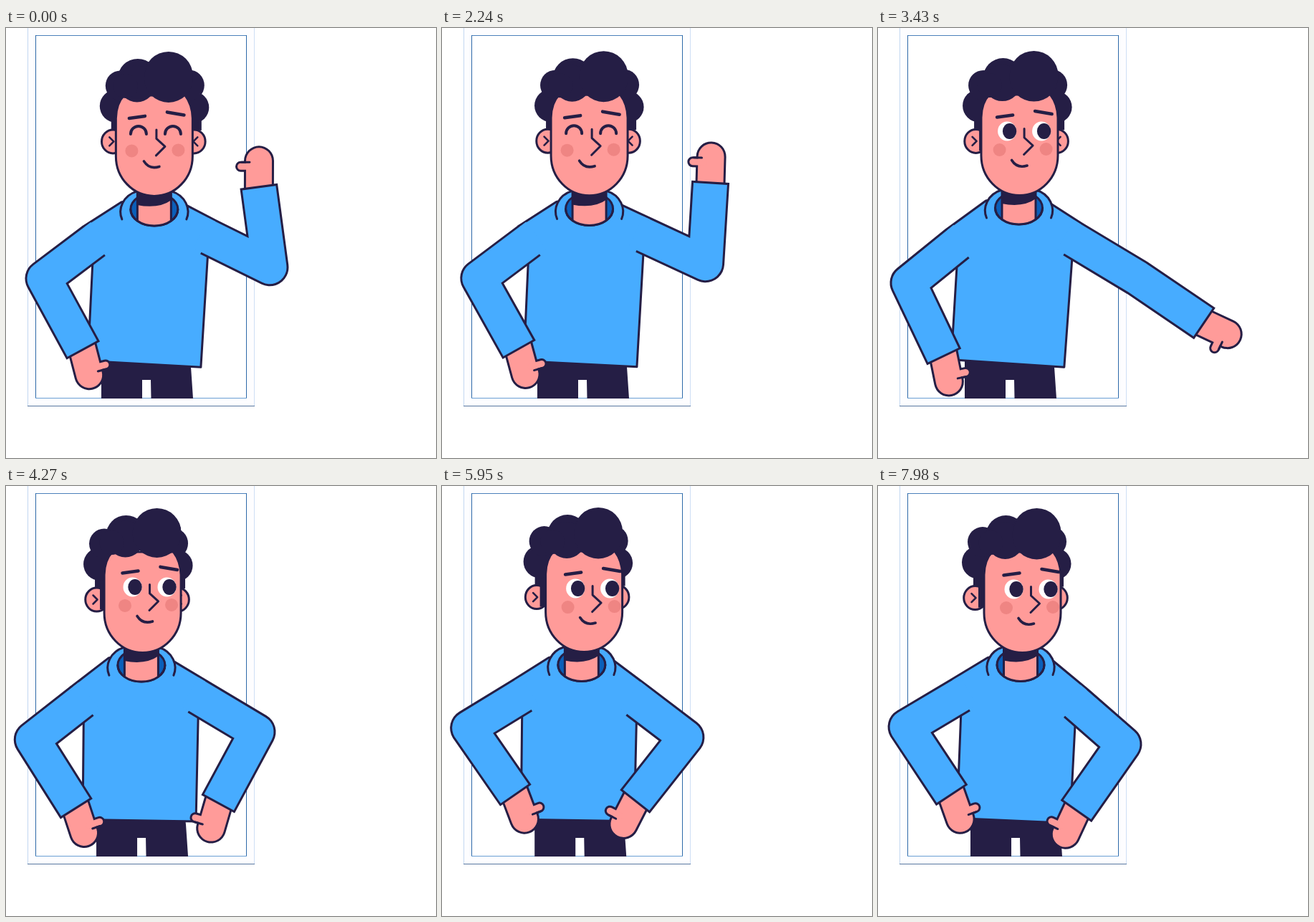
An HTML page with a canvas for the animation above (8000 ms loop, 600 by 600 pixels).

```html
<!DOCTYPE html>
<html lang="en">
<head>
<meta charset="utf-8">
<title>Waving man</title>
<style>
  html, body { margin: 0; width: 100%; height: 100%; overflow: hidden; background: #fff; }
  canvas { display: block; width: 600px; height: 600px; }
</style>
</head>
<body>
<canvas id="stage" width="600" height="600"></canvas>
<script>
const ctx = document.getElementById('stage').getContext('2d');
const DARK = '#251e45', SKIN = '#ff9b99', BLUE = '#47acff', NAVY = '#0b5fb9', BLUSH = '#ef8583';
const LOOP = 8000, WAVE = 980, WAVE_START = 66, WAVE_END = 2516;
const RAD = Math.PI / 180, FOREARM = 113;

// collar x y | hem x y tilt | head x, chin y, turn, pitch |
// left shoulder x y, upper and lower arm angle | right shoulder x y, upper angle, length, lower angle, wrist bend
const rest = [207, 254, 193, 469, 3.2, 207, 236, 0, 0, 123, 297, 143, 61.5, 283, 292, 26.5, 95, -99, 9];
const keys = [
  [WAVE_END, [203.5, 252.5, 193, 468.5, 2.5, 203.5, 234, .15, 0, 120, 296, 143.3, 59.7, 279, 284, 22.5, 95, -68, -18]],
  [3430, [196.5, 252, 181, 468, 3.8, 197.5, 235, .4, -.5, 111, 300.6, 141, 64.5, 272, 294.6, 31, 104, 34, -9]],
  [5100, [184.5, 250.5, 191, 466, -2, 186.5, 233, 1, -4, 104.4, 297.7, 144.3, 51.1, 264.7, 292.5, 30.7, 87, 118.3, -15]],
  [6790, [205, 250.5, 187.5, 467, 3.8, 209.5, 233, 1, 5, 120, 288, 151.4, 59.3, 280, 306, 43.7, 85, 126.5, -7.5]],
  [7980, [199, 250.5, 189, 467, 2.6, 201.5, 234, 1, .5, 115.3, 291.5, 149.3, 56.5, 276.4, 303, 41.1, 87, 125, -10]]
];

const mix = (a, b, u) => a + (b - a) * u;
const clamp = u => Math.max(0, Math.min(1, u));
const smoother = u => { u = clamp(u); return u * u * u * (u * (u * 6 - 15) + 10); };
const polar = ([x, y], deg, r) => [x + r * Math.cos(deg * RAD), y + r * Math.sin(deg * RAD)];

function speed(i, c) {
  const rate = j => (keys[j + 1][1][c] - keys[j][1][c]) / (keys[j + 1][0] - keys[j][0]);
  if (i === 0) return 0;
  if (i === keys.length - 1) return rate(i - 1) * 1.5;
  const a = rate(i - 1), b = rate(i);
  return a * b <= 0 ? 0 : (a + b) / 2;
}

function poseAt(t) {
  if (t < WAVE_END) {
    const u = (1 - Math.cos((t - WAVE_START) / WAVE * 2 * Math.PI)) / 2;
    return rest.map((v, c) => mix(v, keys[0][1][c], u));
  }
  let i = 0;
  while (i < keys.length - 2 && t >= keys[i + 1][0]) i++;
  const [t0, a] = keys[i], [t1, b] = keys[i + 1];
  const d = t1 - t0, u = clamp((t - t0) / d), w = 1 - u;
  const pose = a.map((v, c) =>
    v * (1 + 2 * u) * w * w + b[c] * u * u * (3 - 2 * u) +
    d * u * w * (speed(i, c) * w - speed(i + 1, c) * u));
  // the lowering arm swings faster than the body
  if (t < 5100) pose[17] = mix(-68, 118.3, smoother((t - 2800) / 1200));
  return pose;
}

function line(points, width, color, cap = 'round') {
  ctx.beginPath();
  points.forEach(p => ctx.lineTo(p[0], p[1]));
  ctx.lineWidth = width;
  ctx.strokeStyle = color;
  ctx.lineCap = cap;
  ctx.lineJoin = 'round';
  ctx.stroke();
}

function paint(fill, width = 3) {
  if (fill) { ctx.fillStyle = fill; ctx.fill(); }
  if (width) { ctx.lineWidth = width; ctx.strokeStyle = DARK; ctx.lineCap = ctx.lineJoin = 'round'; ctx.stroke(); }
}

function oval(x, y, rx, ry, fill, width = 0) {
  ctx.beginPath();
  ctx.ellipse(x, y, rx, ry, 0, 0, 2 * Math.PI);
  paint(fill, width);
}

function drawFrame() {
  ctx.fillStyle = '#fdfdff';
  ctx.fillRect(30, 0, 317, 527);
  ctx.fillStyle = '#fff';
  ctx.fillRect(41, 10, 295, 507);
  const bar = (x, y, w, h, c) => { ctx.fillStyle = c; ctx.fillRect(x, y, w, h); };
  bar(30, 0, 1, 527, '#c3d7f0');
  bar(346, 0, 1, 527, '#cfdff4');
  bar(30, 527, 317, 1, '#5877a0');
  bar(41, 10, 295, 1, '#4a80bb');
  bar(41, 10, 1, 507, '#2d68a8');
  bar(335, 10, 1, 507, '#2d68a8');
  bar(41, 516, 295, 1, '#6b9fd4');
}

function drawLegs(x, y) {
  ctx.beginPath();
  [[-60, y - 12], [63, y - 12], [65, 473], [68, 517], [9.5, 517], [9, 491], [-3, 491], [-3, 517], [-60, 517]]
    .forEach(p => ctx.lineTo(x + p[0], p[1]));
  paint(DARK, 0);
}

function drawTorso(collar, hem, tilt, topL, topR) {
  const at = (x, y) => polar(polar(hem, tilt, x), tilt + 90, y);
  const [x, y] = collar;
  ctx.beginPath();
  [[x, y - 20], [x - 46, y - 11], topL, at(-80, -160), at(-79, 0), at(79, 0), at(80, -160), topR, [x + 46, y - 6]]
    .forEach(p => ctx.lineTo(p[0], p[1]));
  ctx.closePath();
  paint(BLUE);
}

function drawHand(wrist, dir, side) {
  const palm = polar(wrist, dir, 36.5);
  const at = (x, y) => polar(polar(palm, dir, x), dir + 90, y * side);
  const body = [polar(wrist, dir, -4), palm], thumb = [at(-8, 10), at(-8, 25.5)];
  line(body, 42, DARK);
  line(thumb, 15, DARK);
  line(body, 36, SKIN);
  line(thumb, 9, SKIN);
  line([at(-2, 13), at(-2, 24)], 3, DARK);
}

function drawArm(shoulder, upper, length, lower, bend, thumbSide) {
  const elbow = polar(shoulder, upper, length), cuff = polar(elbow, lower, FOREARM);
  drawHand(cuff, lower + bend, thumbSide);
  line([shoulder, elbow, polar(cuff, lower, 1.5)], 53, DARK, 'butt');
  line([polar(shoulder, upper, -12), elbow, polar(cuff, lower, -1.5)], 47, BLUE, 'butt');
}

function drawCollar(x, y) {
  oval(x, y - 2, 46, 27, BLUE);
  for (const s of [-1, 1]) {
    ctx.beginPath();
    ctx.moveTo(x + s * 45, y + 13);
    ctx.bezierCurveTo(x + s * 51, y - 1, x + s * 44, y - 20, x + s * 24, y - 26);
    paint(null);
  }
  oval(x, y - 1, 33, 23, NAVY, 3);
  ctx.save();
  ctx.beginPath();
  ctx.ellipse(x, y - 1, 33, 23, 0, 0, Math.PI);
  ctx.rect(x - 33, y - 40, 66, 40);
  ctx.clip();
  ctx.beginPath();
  ctx.rect(x - 23.5, y - 30, 47, 70);
  paint(SKIN);
  ctx.beginPath();
  ctx.moveTo(x - 24, y - 30);
  ctx.lineTo(x - 24, y - 7);
  ctx.quadraticCurveTo(x + 6, y - 1, x + 24, y - 14);
  ctx.lineTo(x + 24, y - 30);
  paint(DARK, 0);
  ctx.restore();
  ctx.beginPath();
  ctx.ellipse(x, y - 1, 33, 23, 0, 0, Math.PI);
  paint(null);
}

function drawFeatures(x, y, open) {
  const seg = (w, ...pts) => line(pts.map(p => [x + p[0], y + p[1]]), w, DARK);
  oval(x - 34.5, y + 29.5, 9, 9, BLUSH);
  oval(x + 30.5, y + 28.5, 9, 9, BLUSH);
  for (const s of [-24, 24]) {
    if (open) {
      oval(x + s, y + 3.5, 13, 13.5, '#fff');
      oval(x + s + 3.5, y + 3.5, 9.7, 11, DARK);
    } else {
      ctx.beginPath();
      ctx.arc(x + s - 1, y + 6, 11, Math.PI, 0);
      paint(null, 4);
    }
  }
  seg(4.6, [-38, -16], [-16, -19]);
  seg(4.6, [15, -24.5], [38.5, -20.5]);
  seg(3, [0, 0], [0, 12.5], [12, 23.5], [-.5, 36]);
  ctx.beginPath();
  ctx.moveTo(x - 17.5, y + 44);
  ctx.quadraticCurveTo(x - 10, y + 56, x + 4, y + 51.5);
  paint(null, 3.6);
}

function drawHead(x, chin, turn, pitch, open) {
  const back = x - 8.5 * turn, sideY = chin - pitch * .8;
  const lump = (bx, by, r) => oval(bx, by, r, r, DARK);

  for (const s of [-1, 1]) {
    const ex = back + s * 57 + (s > 0 ? -1.5 : -.5), ey = sideY - 77.5;
    oval(ex, ey, 15.8, 16.5, SKIN, 3);
    line([[ex - s * -5, ey - 6], [ex - s * 1, ey], [ex - s * -5, ey + 6]], 2.6, DARK);
  }
  ctx.fillStyle = DARK;
  ctx.fillRect(back - 60, sideY - 130, 22, 37);
  ctx.fillRect(back + 44, sideY - 130, 22, 37);
  ctx.fillRect(back - 53, sideY - 100, 12, 36);
  lump(back - 53, sideY - 127, 23);
  lump(back + 54.5, sideY - 125, 22);
  lump(back - 47, sideY - 155.5, 21);
  lump(back + 48.5, sideY - 156, 21.5);

  ctx.beginPath();
  ctx.moveTo(x - 53.5, chin - 110);
  ctx.quadraticCurveTo(x - 53, chin - 131, x - 42, chin - 142);
  ctx.lineTo(x + 43, chin - 142);
  ctx.quadraticCurveTo(x + 53, chin - 129, x + 53.5, chin - 110);
  ctx.lineTo(x + 53.5, chin - 57);
  ctx.ellipse(x, chin - 57, 53.5, 55.5, 0, 0, Math.PI);
  ctx.closePath();
  paint(SKIN);

  lump(x - 23, chin - 165, 28);
  lump(x + 20, chin - 169, 34);
  lump(x - 24, chin - 158 + pitch * .8, 25.5);
  lump(x + 20, chin - 166 + pitch * .8, 34);
  lump(x - 40 - 4 * turn, chin - 155, 17);

  drawFeatures(x + 3 + 9 * turn, chin - 94 + pitch, open);
}

function draw(t) {
  const [cx, cy, hx, hy, tilt, headX, chin, turn, pitch,
    lx, ly, lUp, lLow, rx, ry, rUp, rLen, rLow, rBend] = poseAt(t);
  const left = [lx, ly], right = [rx, ry];
  ctx.clearRect(0, 0, 600, 600);
  drawFrame();
  drawLegs(hx, hy);
  drawTorso([cx, cy], [hx, hy], tilt, polar(left, lUp + 90, 25), polar(right, rUp - 90, 25));
  drawArm(left, lUp, 87.5, lLow, 14, -1);
  drawArm(right, rUp, rLen, rLow, rBend, mix(-1, 1, smoother((t - 2800) / 400)));
  drawCollar(cx, cy);
  drawHead(headX, chin, turn, pitch, t >= 2800);
}

const start = performance.now();
function tick() {
  draw((performance.now() - start) % LOOP);
  requestAnimationFrame(tick);
}
tick();
</script>
</body>
</html>
```
